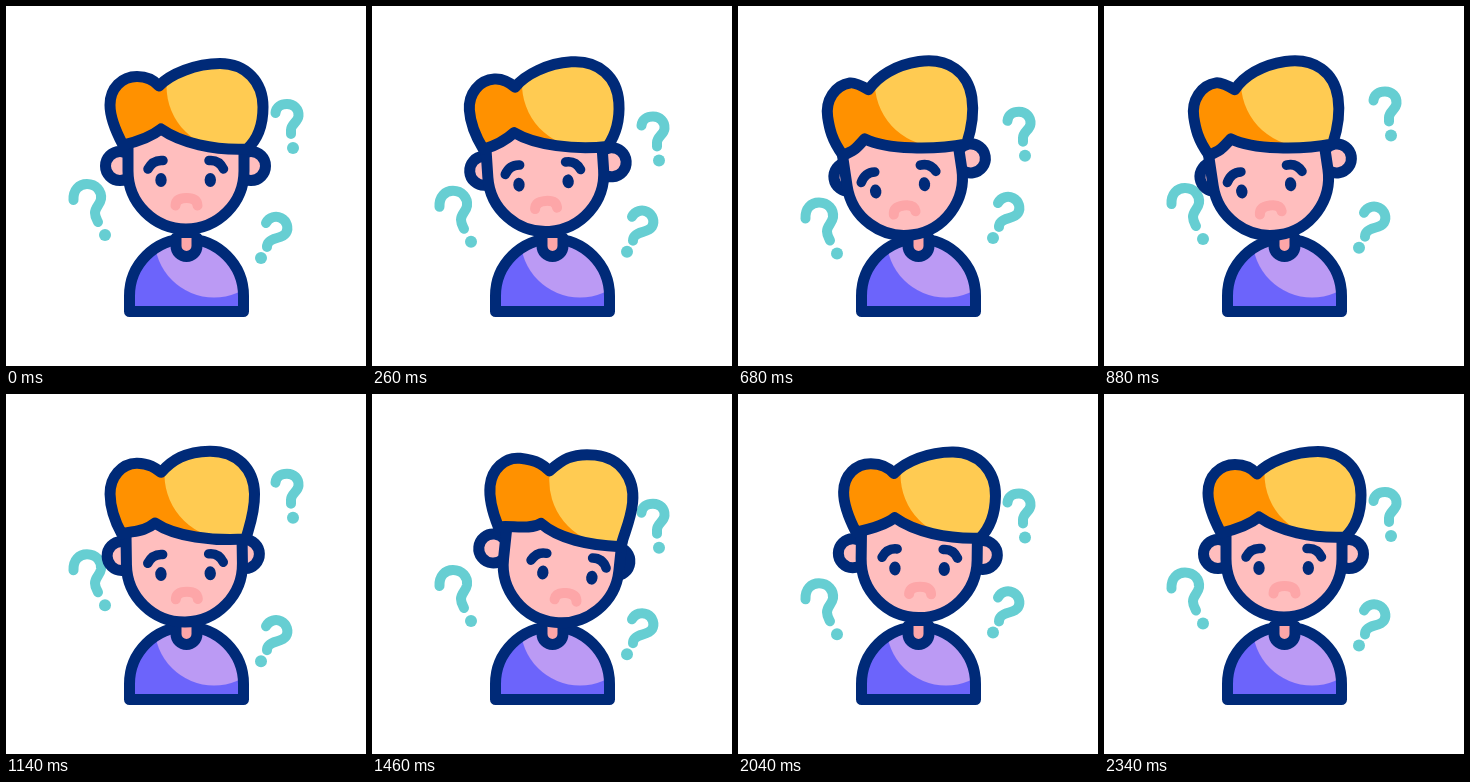
Animation of 360x360 px, one loop 2.4 s. Source, as an HTML page with a canvas:

```html
<!DOCTYPE html>
<html lang="en">
<head>
<meta charset="utf-8">
<title>Puzzled boy</title>
<style>
  html, body { margin: 0; width: 100%; height: 100%; overflow: hidden; background: #fff; }
  canvas { display: block; width: 360px; height: 360px; }
</style>
</head>
<body>
<canvas id="stage" width="360" height="360"></canvas>
<script>
const ctx = document.getElementById('stage').getContext('2d');
const LOOP = 2400, LAST_POSE = 2340;
const NAVY = '#002a78', SKIN = '#ffbebe', BLUSH = '#fda6a8', TEAL = '#66ced2';
const ORANGE = '#ff9100', YELLOW = '#ffcb52', VIOLET = '#6c64fb', LILAC = '#bb9af4';
const LINE = 11;

const BODY = new Path2D('M123.5 305.5V290A57 57 0 0 1 237.5 290V305.5Z');
const COLLAR = new Path2D('M170 232V240A10.5 10.5 0 0 0 191 240V232');
const FACE = new Path2D('M122 125V165A58 58 0 0 0 238 165V125');
const BROWS = new Path2D('M142 163Q147 153.5 157 154.5M203 154.5Q213 153.5 217.5 163');
const MOUTH = new Path2D('M169.5 199.5Q170 192 180.5 192Q191 192 191.5 199.5');
const HOOK_LEFT = new Path2D('M67.5 194C67 184 73 178 81 178C90 178 96 185 95 193C94 199 89 201 89 207C89 211 91 214 92 216');
const HOOK_TOP = new Path2D('M269.5 107C270 101 275 98 281 98C288 98 293 103 292.5 110C292 116 285 118 285 124V128');
const HOOK_LOW = new Path2D('M260 217C263 211 270 209.5 275 212C281 215 283 222 280 227C276 233 267 231 263 236Q261 238 261 241');

// Smooth step from 0 to 1 between two times.
function ramp(t, from, to) {
  const u = Math.min(1, Math.max(0, (t - from) / (to - from)));
  return u * u * (3 - 2 * u);
}

// Rise to reach, swing to the other side and back, then settle at rest.
function swing(t, reach, first, step, rest) {
  const second = first + step, third = second + step;
  return reach * (ramp(t, 0, first) - 2 * ramp(t, first, second)
    + 2 * ramp(t, second, third) - ramp(t, third, rest));
}

function stroke(path, color, width) {
  ctx.strokeStyle = color;
  ctx.lineWidth = width;
  ctx.stroke(path);
}

function fill(path, color) {
  ctx.fillStyle = color;
  ctx.fill(path);
}

function outlined(path, color) {
  fill(path, color);
  stroke(path, NAVY, LINE);
}

function ellipse(x, y, rx, ry = rx) {
  const path = new Path2D();
  path.ellipse(x, y, rx, ry, 0, 0, 2 * Math.PI);
  return path;
}

function shifted(dx, dy, paint) {
  ctx.save();
  ctx.translate(dx, dy);
  paint();
  ctx.restore();
}

// Fill with a highlight clipped inside, then outline.
function shaded(path, base, light, highlight) {
  fill(path, base);
  ctx.save();
  ctx.clip(path);
  fill(highlight, light);
  ctx.restore();
  stroke(path, NAVY, LINE);
}

function drawQuestion(hook, dotX, dotY, dy) {
  shifted(0, dy, () => {
    stroke(hook, TEAL, 10);
    fill(ellipse(dotX, dotY, 6), TEAL);
  });
}

function drawBody() {
  shaded(BODY, VIOLET, LILAC, ellipse(208, 232, 59.5));
  outlined(COLLAR, BLUSH);
}

function hairPath(turn, nod) {
  const lobe = 2 * nod - 1.5 * turn, lobeTop = 70.5 - 2 * nod;
  const notch = 153 + 4 * nod + 5 * turn, notchY = 80 - 2 * nod;
  const peak = 214 - 8 * nod;
  const right = 257 - 6.5 * nod - 2.5 * turn;
  const tipX = 155 - 5 * nod + 9 * turn, tipY = 123 + 5.5 * nod + 2.5 * turn;
  const low = 143 + 3 * nod;
  return new Path2D(
    `M117 139C108 122 ${104 + lobe} 110 ${104 + lobe} 99` +
    `C${104 + lobe} 82 ${116 + lobe} ${lobeTop} ${131 + lobe} ${lobeTop}` +
    `C${notch - 12} ${lobeTop} ${notch - 5} 74 ${notch} ${notchY}` +
    `C${notch + 11} ${notchY - 12} ${peak - 24} 57.5 ${peak} 57.5` +
    `C${right - 17} 57.5 ${right} 76 ${right} 101` +
    `C${right} 120 ${right - 6} 134 241 ${low}` +
    `C208 ${low + 1.5} ${tipX + 20} ${tipY + 14} ${tipX} ${tipY}` +
    `C${tipX - 10} ${tipY + 8} 130 136 117 139Z`
  );
}

function drawFeatures() {
  stroke(BROWS, NAVY, 9.5);
  for (const x of [155, 204.3]) fill(ellipse(x, 174, 5.7, 7), NAVY);
  stroke(MOUTH, BLUSH, 10);
}

function drawHead(t) {
  const rise = ramp(t, 0, 560), settle = ramp(t, 1600, 2160);
  const nod = rise - settle;
  const turn = 2 * ramp(t, 860, 1400) - rise - settle;
  const angle = 7.25 * turn - 1.25 * nod;

  ctx.save();
  ctx.translate(180, 225);
  ctx.rotate(angle * Math.PI / 180);
  ctx.translate(-180, -225);
  const earY = 160 + nod;
  outlined(ellipse(114 + 2.7 * nod - 2.5 * turn, earY, 14.5), SKIN);
  outlined(ellipse(245 - 5 * nod - 3 * turn, earY, 14.5), SKIN);
  // Nearer parts slide further as the head turns.
  shifted(4.5 * turn - nod, 5 * nod, () => outlined(FACE, SKIN));
  shifted(11 * turn, 5.7 * nod, drawFeatures);
  shaded(hairPath(turn, nod), ORANGE, YELLOW, ellipse(225 + 2 * turn, 80 + nod, 64.5));
  ctx.restore();
}

function draw(now) {
  const t = Math.min(now % LOOP, LAST_POSE);
  ctx.fillStyle = '#fff';
  ctx.fillRect(0, 0, 360, 360);
  ctx.lineCap = ctx.lineJoin = 'round';
  drawQuestion(HOOK_LEFT, 99, 229, swing(t, 19, 640, 560, LOOP));
  drawQuestion(HOOK_TOP, 287, 142, swing(t, 21, 460, 590, 2120));
  drawQuestion(HOOK_LOW, 255, 252, swing(t, -20, 700, 560, LOOP));
  drawBody();
  drawHead(t);
}

let start;
function tick(now) {
  start ??= now;
  draw(now - start);
  requestAnimationFrame(tick);
}
draw(0);
requestAnimationFrame(tick);
</script>
</body>
</html>
```
